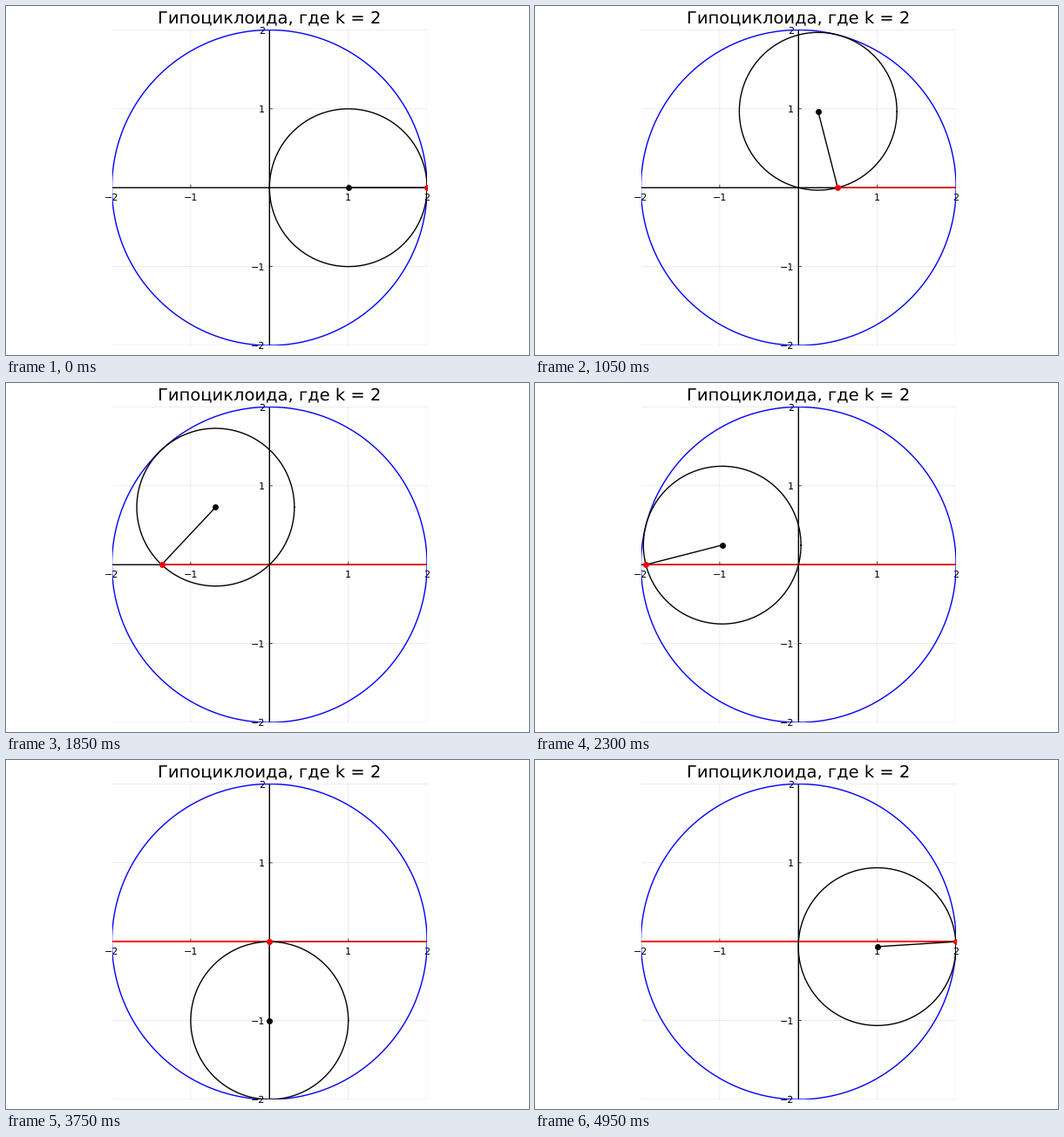
Write a matplotlib script that moves like this. It is 600 px wide and 400 px high and loops after 5000 ms.

```python
import numpy as np
import matplotlib
import matplotlib.pyplot as plt
from matplotlib.animation import FuncAnimation

matplotlib.rcParams["font.family"] = "DejaVu Sans"
matplotlib.rcParams["text.hinting"] = "none"

W, H, DPI = 600, 400, 100
CX, CY, UNIT = 302.3, 208.25, 90.4   # origin and unit length in pixels
K = 2                                # outer radius / inner radius
FRAMES, INTERVAL = 100, 50

fig = plt.figure(figsize=(W / DPI, H / DPI), dpi=DPI, facecolor="white")
ax = fig.add_axes([(CX - K * UNIT) / W, 1 - (CY + K * UNIT) / H,
                   2 * K * UNIT / W, 2 * K * UNIT / H])
ax.set_xlim(-K, K)
ax.set_ylim(-K, K)
ax.axis("off")


def line(x, y, color="black", lw=1.0, **kw):
    return ax.plot(x, y, color=color, lw=lw, snap=False, **kw)[0]


def dot(color):
    return line([], [], color, marker="o", ms=5, mew=0)


def label(x, y, text, size, ha):
    """Place text by its baseline, in pixels from the top left."""
    fig.text(x / W, 1 - y / H, text, fontsize=size, ha=ha, va="baseline",
             zorder=-1)


def draw_axes():
    ticks = range(-K, K + 1)
    for t in ticks:
        line([t, t], [-K, K], lw=0.5, alpha=0.1)
        line([-K, K], [t, t], lw=0.5, alpha=0.1)
    line([-K, K], [0, 0])
    line([0, 0], [-K, K])
    tick = 3.2 / UNIT
    for t in ticks:
        if t == 0:
            continue
        line([t, t], [0, tick], lw=0.5)
        line([0, tick], [t, t], lw=0.5)
        text = str(t).replace("-", "\u2212")
        label(CX + t * UNIT, 223, text, 8, "center")
        label(297.3, CY - t * UNIT + 4.2, text, 8, "right")
    label(CX, 20, f"Гипоциклоида, где k = {K}", 14, "center")


draw_axes()
turn = np.linspace(0, 2 * np.pi, 361)
ring_x, ring_y = np.cos(turn), np.sin(turn)
line(K * ring_x, K * ring_y, "blue")
trace = line([], [], "red")
wheel = line([], [])
spoke = line([], [])
hub = dot("black")
pen = dot("red")


def center(a):
    return (K - 1) * np.cos(a), (K - 1) * np.sin(a)


def pen_point(a):
    x, y = center(a)
    return x + np.cos((K - 1) * a), y - np.sin((K - 1) * a)


def update(i):
    a = 2 * np.pi * i / FRAMES
    x, y = center(a)
    px, py = pen_point(a)
    trace.set_data(*pen_point(np.linspace(0, a, 2 * i + 1)))
    wheel.set_data(x + ring_x, y + ring_y)
    spoke.set_data([x, px], [y, py])
    hub.set_data([x], [y])
    pen.set_data([px], [py])
    return trace, wheel, spoke, hub, pen


anim = FuncAnimation(fig, update, frames=FRAMES, interval=INTERVAL,
                     repeat=True, repeat_delay=0)
plt.show()
```
